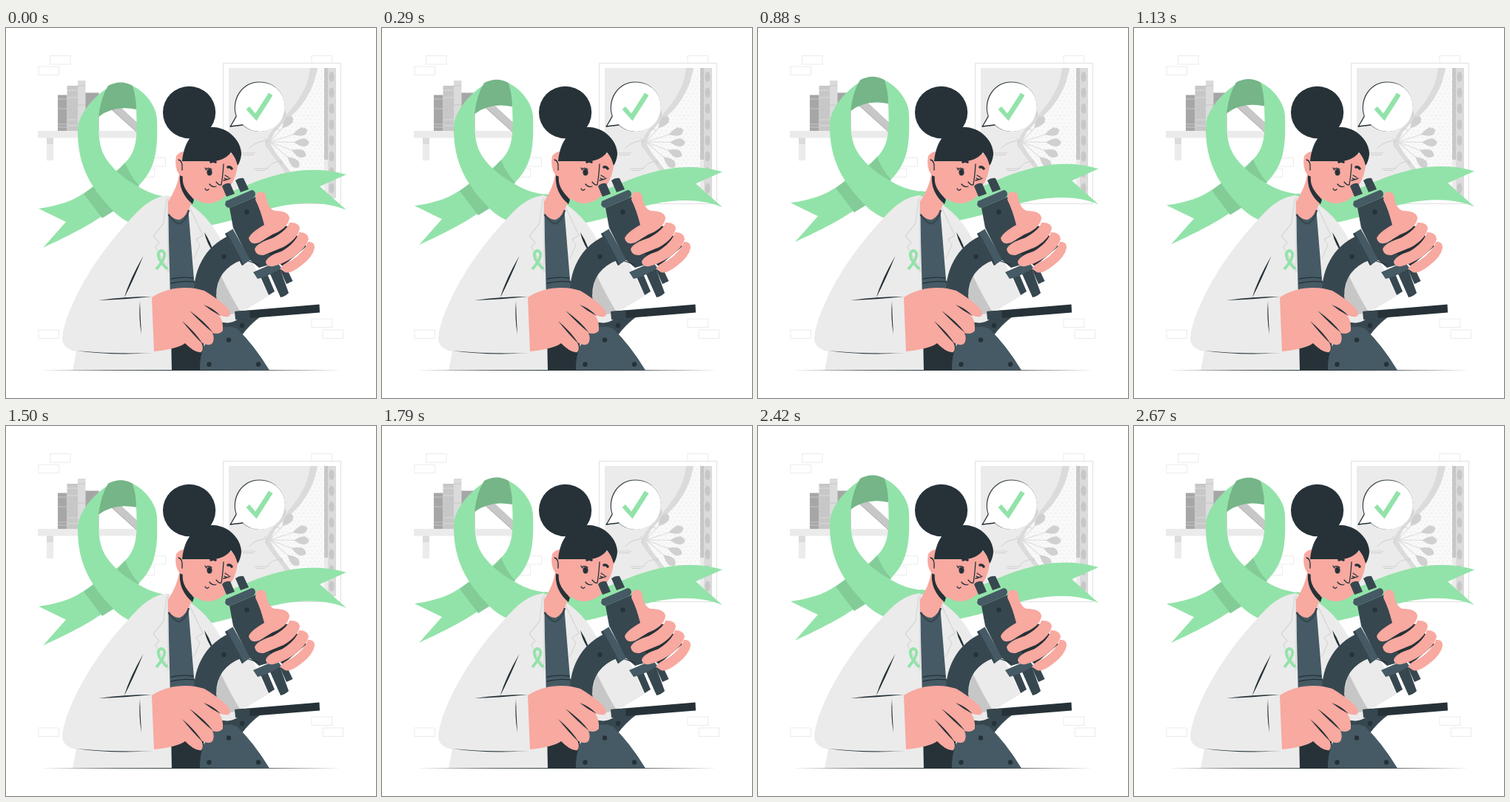
Write an HTML page that moves like this. It is 500x500 px and loops after 2.71 s.

```html
<!DOCTYPE html>
<html lang="en">
<head>
<meta charset="utf-8">
<title>Microscope and ribbon</title>
<style>
  html, body { margin: 0; width: 100%; height: 100%; overflow: hidden; background: #fff }
  svg { display: block; width: 100vw; height: 100vh }
  .ink { fill: #263238 }
  .slate { fill: #37474f }
  .steel { fill: #455a64 }
  .skin { fill: #f8a9a0 }
  .coat { fill: #ebebeb }
  .green { fill: #92e3a9 }
  .shade { fill: #83cc98 }
  .line { fill: none; stroke: #263238; stroke-width: 1.3; stroke-linecap: round; stroke-linejoin: round }
  .fold { fill: none; stroke: #d6d6d6; stroke-width: 1.2 }
  .thin { fill: none; stroke: #e6e6e6 }
</style>
</head>
<body>
<svg viewBox="0 0 500 500">
  <defs>
    <pattern id="cells" width="6" height="10" patternUnits="userSpaceOnUse">
      <path fill="none" stroke="#fff" stroke-width=".9" d="M0 1.500L3 0L6 1.500V5L3 6.500L0 5zM3 6.500V10"/>
    </pattern>
    <path id="tissue" d="M421 54H430V230H400C398 200 368 180 358 157Q356 146 372 131C396 111 414 92 421 54z"/>
    <path id="balloon" d="M303 133L311 119C304 97 318 73 342 73C362 73 376 87 376 106C376 126 361 139 342 139.500Q329 139 320 131z"/>
  </defs>

  <g id="bricks" class="thin" stroke-width=".8"></g>

  <g id="shelf">
    <path class="coat" d="M43 139H190V148.500H43zM55 148H64V179H55z"/>
    <path fill="#dbdbdb" d="M55 148.500H64V157H55z"/>
    <path fill="#a6a6a6" d="M70 90.500H82.500V139H70zM107 87.500H125.500V139H107z"/>
    <path fill="#c7c7c7" d="M82.500 78H97.500V139H82.500z"/>
    <path fill="#dbdbdb" d="M97 71H107.500V139H97z"/>
    <path fill="none" stroke="#c7c7c7" d="M70 96H82M70 109H82M70 130H82M70 134H82M97 78H107M97 104H107"/>
    <path fill="none" stroke="#dbdbdb" d="M83 84H97M83 94H97M83 124H97M83 132H97"/>
    <path fill="#c7c7c7" d="M136 104L144 97L183 133L176 140z"/>
    <path fill="none" stroke="#a6a6a6" d="M136 104L176 140"/>
  </g>

  <g id="poster">
    <path fill="#fff" stroke="#e0e0e0" d="M293.500 47.500H452.500V237.500H293.500z"/>
    <path class="coat" d="M301 54H446V230H301z"/>
    <path fill="#dbdbdb" d="M411 54H430V230H390C388 200 362 178 350 158Q352 146 366 131C388 108 407 88 411 54z"/>
    <use href="#tissue" fill="#f5f5f5"/>
    <use href="#tissue" fill="url(#cells)"/>
    <path fill="#c7c7c7" d="M430 54H435V178H430z"/>
    <path fill="#dbdbdb" d="M435 54H446V230H435z"/>
    <g id="ribs" fill="#c7c7c7"></g>
    <g id="lobes" fill="#d0d0d0" stroke="#dcdcdc"></g>
    <path fill="none" stroke="#cfcfcf" d="M328 163Q340 151 354 153M349 149L354 153L350 157M352 191Q360 178 374 181M370 177L374 181L370 184M362 138Q366 134 371 139M318 169H337M320 171.500H335M335 190H354M337 192.500H350"/>
  </g>

  <g id="ribbon">
    <path class="green" d="M220 228Q270 236 310 219C355 199 405 182 460 198L424 214L460 246C420 229 370 238 330 252Q300 262 275 267Q240 277 200 270z"/>
    <path class="green" d="M155 73.500C178 75 203 100 204 123C206 174 200 196 170 222C140 248 124 263 50 297L81 262L44 244C80 239 100 230 125 208Q146 198 161 182C179 165 177 140 176 108z"/>
    <path class="shade" d="M150 194L161 182Q168 200 180 213L174 219zM105 224L120 213L146 247L130 257z"/>
    <path class="green" d="M155 73.500C138 75 98 108 97 137C96 188 117 217 140 242Q151 255 165 262Q195 278 220 270L230 229Q203 229 180 215Q162 205 151 195C126 171 125 156 125 120L140 90z"/>
    <path fill="#75b587" d="M138 78Q155 69 171 78Q176 94 176 110Q146 104 125 120Q128 94 138 78z"/>
  </g>

  <g id="bubble">
    <use href="#balloon" class="ink" stroke="#263238" stroke-width=".8" stroke-linejoin="round"/>
    <use href="#balloon" fill="#fff" transform="translate(.8 .4)"/>
    <path class="line" stroke-width="1" d="M303 133L320 131"/>
    <path class="green" d="M324.500 110L329 106L337 115.500L355 87.500L360.500 91L338.500 125.500z"/>
  </g>

  <g id="body">
    <path class="coat" d="M218 226C192 230 178 248 165 262C125 304 82 372 76 418Q76 434 95 437L90 462.500H262L300 395L355 362L330 310L293 292Q278 258 247 237z"/>
    <path fill="#c7c7c7" d="M290 334Q305 365 317 384L297 392L283 362z"/>
    <path class="steel" d="M219 248L246 242L254 340L262 365H222z"/>
    <path class="ink" d="M222 362H262L270 462.500H224z"/>
    <path class="line" d="M223 339Q238 336 253 338M223 345Q238 341 255 343"/>
    <path class="fold" d="M217 231L213 264L199 281L207 290L202 296L221 329M248 242L266 280L257 286L262 293L254 312M219 228L219 330"/>
    <path class="skin" d="M234 198Q232 214 219 235V250Q227 260 235 259Q244 255 250 238L262 215z"/>
    <path fill="none" stroke="#37474f" stroke-width="2.500" d="M219.500 252Q231 268 237 263Q244 258 247 246"/>
    <path class="ink" d="M235 199Q233 222 252 238L254 232Q241 219 238.500 200z"/>
    <path fill="none" stroke="#92e3a9" stroke-width="3.800" d="M203 326Q216 311 214 304Q210 298 206 304Q204 312 218 326"/>
    <path class="ink" d="M185.500 308Q167 340 159.500 365Q173 339 185.500 308zM125 368Q160 363 197 363Q160 367 125 368zM181 369Q179 391 183 414Q181.500 391 181 369zM95 436Q145 441 199 439Q145 443 95 436zM268 276Q276 288 281 304Q271 291 268 276z"/>
  </g>

  <g id="head">
    <ellipse class="ink" cx="247.600" cy="114" rx="35.600" ry="35.200"/>
    <path class="skin" d="M243 167Q235 166 230 173Q227 188 234 198Q237 201 239 200C236 220 258 238 275 237Q298 234 304 212Q315 195 313 170z"/>
    <path class="ink" d="M238 180C241 150 256 133 281 134C306 136 319 158 318 171Q317 180 313 186Q310 174 304 168Q294 181 275 180z"/>
    <path class="line" d="M233 178Q239 179 238 192M294 184Q293 200 291 212Q288 213 284 208M269 217Q271 221 274 218M275 211Q279 216 284 214M295 203Q299 206 303 203M294 206L298 205M296 199L301 202"/>
    <ellipse class="ink" cx="275" cy="195" rx="3.600" ry="4.600"/>
    <path class="line" d="M278 191Q273 188 270 191M271 192L269 189"/>
    <path fill="none" stroke="#263238" stroke-width="3.500" stroke-linecap="round" d="M277 181Q280 179 283 181M300 188Q303 187 305 190"/>
  </g>

  <g id="microscope">
    <path class="slate" d="M303 280C269 294 250 329 255 370L262 400L288 390L284 362Q284 326 320 313z"/>
    <path fill="#ebebeb" d="M296 388L310 386L314 394Q302 402 293 394z"/>
    <path class="slate" d="M286 396Q303 402 314 393L344 390Q330 400 318 416L296 414z"/>
    <path class="steel" d="M262 462.500Q261 430 282 409Q297 400 312 406Q335 428 356 462.500z"/>
    <path class="ink" d="M310 383L423.500 373.500L424 384.500L331 392L310 394z"/>
    <path class="slate" d="M309 383L329 381.500L330 393L310 394z"/>
    <path class="slate" d="M292 214Q296 209 303 210L309 224L298 228zM310 206Q315 202 321 203L328 218L317 222z"/>
    <path class="slate" d="M302 243L338 228L362 280L362 318L342 324L328 312L307 270z"/>
    <path class="steel" d="M297 234L332 219Q336 219 337 224Q337 228 333 230L302 243Q298 243 296 239z"/>
    <path class="slate" d="M343 334L352 330L363 356L355 361zM370 326L378 322L387.500 342L379 346z"/>
    <path class="slate" d="M355 328L369 322L382 358Q377 363 371 364z"/>
    <path class="steel" d="M334 330L366 316L372 324Q357 335 340 339z"/>
    <path class="steel" d="M296 278L306.500 271.500L330 313.500L319 321z"/>
    <path class="slate" d="M296 278L298.500 276.500L321.500 319.500L319 321z"/>
    <path class="line" d="M328 315L342 320"/>
    <g id="screws" class="ink"></g>
  </g>

  <g id="hands">
    <path class="ink" d="M352 265L382 268L406 295L374 322L348 298z"/>
    <path class="skin" d="M338 224Q345 218 351 225Q354 246 364 247Q382 247 383 257Q381 271 360 279L342 290Q330 294 328 284Q330 277 349 266Q344 246 337 232z"/>
    <path class="skin" d="M336 299Q338 291 361 283.500Q380 273 383 263Q396 262 397 271Q394 285 375 296L348 307Q338 308 336 299z"/>
    <path class="skin" d="M351 316Q353 308 373 301.500Q392 290 396 276Q408 276 409 285Q406 297 388 310Q374 319 361 322Q352 323 351 316z"/>
    <path class="skin" d="M371 326Q371 320 386 314Q403 303 408 289Q417 288 417 297Q415 309 399 321Q384 333 377 330z"/>
    <path class="skin" d="M197 364C221 348 250 349 268 355Q285 365 298 377Q305 385 302 389Q298 392 288 388Q294 397 293 409Q288 415 279 412Q283 421 278 427Q272 430 264 425Q268 433 264 438Q256 440 242 426Q231 434 200 437z"/>
    <path class="ink" d="M267 374Q281 379 290 389Q278 383 267 374zM248 382Q268 396 280 412Q266 401 248 382zM238 396Q255 410 266 427Q254 416 238 396z"/>
  </g>
  <path class="ink" d="M47 462.500Q250 461.400 453 462.500Q250 463.600 47 462.500z"/>
</svg>
<script>
const $ = id => document.getElementById(id);
const fill = (id, items, draw) => $(id).innerHTML = items.map(draw).join('');

fill('bricks', [[59.5, 37.5], [44, 52], [413, 37.5], [413, 393], [428, 408], [44, 408], [188, 175.5], [173, 190]],
  ([x, y]) => `<rect x="${x}" y="${y}" width="27.5" height="11.5"/>`);
fill('ribs', [...Array(8).keys()],
  i => `<ellipse cx="440" cy="${66 + i * 21.5}" rx="3.5" ry="7"/>`);
fill('lobes', [[-68, 41], [-49, 38], [-18, 45], [1, 45], [21, 44], [41, 44]],
  ([angle, reach]) => `<g transform="translate(357 154) rotate(${angle})">
    <path d="M0 0H${reach - 10}" fill="none"/>
    <path stroke="none" d="M${reach - 13} 0Q${reach - 4} -6 ${reach + 2} -5.5Q${reach + 13} 0 ${reach + 2} 5.5Q${reach - 4} 6 ${reach - 13} 0z"/></g>`);
fill('screws', [[325.5, 248.5], [294.5, 309], [319, 402], [301, 421.5], [274.5, 454.5], [341, 454.5]],
  ([x, y]) => `<circle cx="${x}" cy="${y}" r="3.2"/>`);

const LOOP = 2710, PERIOD = 1485, RISE = 9.6;

function frame(now) {
  const phase = now % LOOP % PERIOD / PERIOD;
  const lift = RISE * (1 - Math.abs(1 - 2 * phase));
  $('ribbon').setAttribute('transform', `translate(0 ${-lift})`);
  requestAnimationFrame(frame);
}
frame(performance.now());
</script>
</body>
</html>
```
